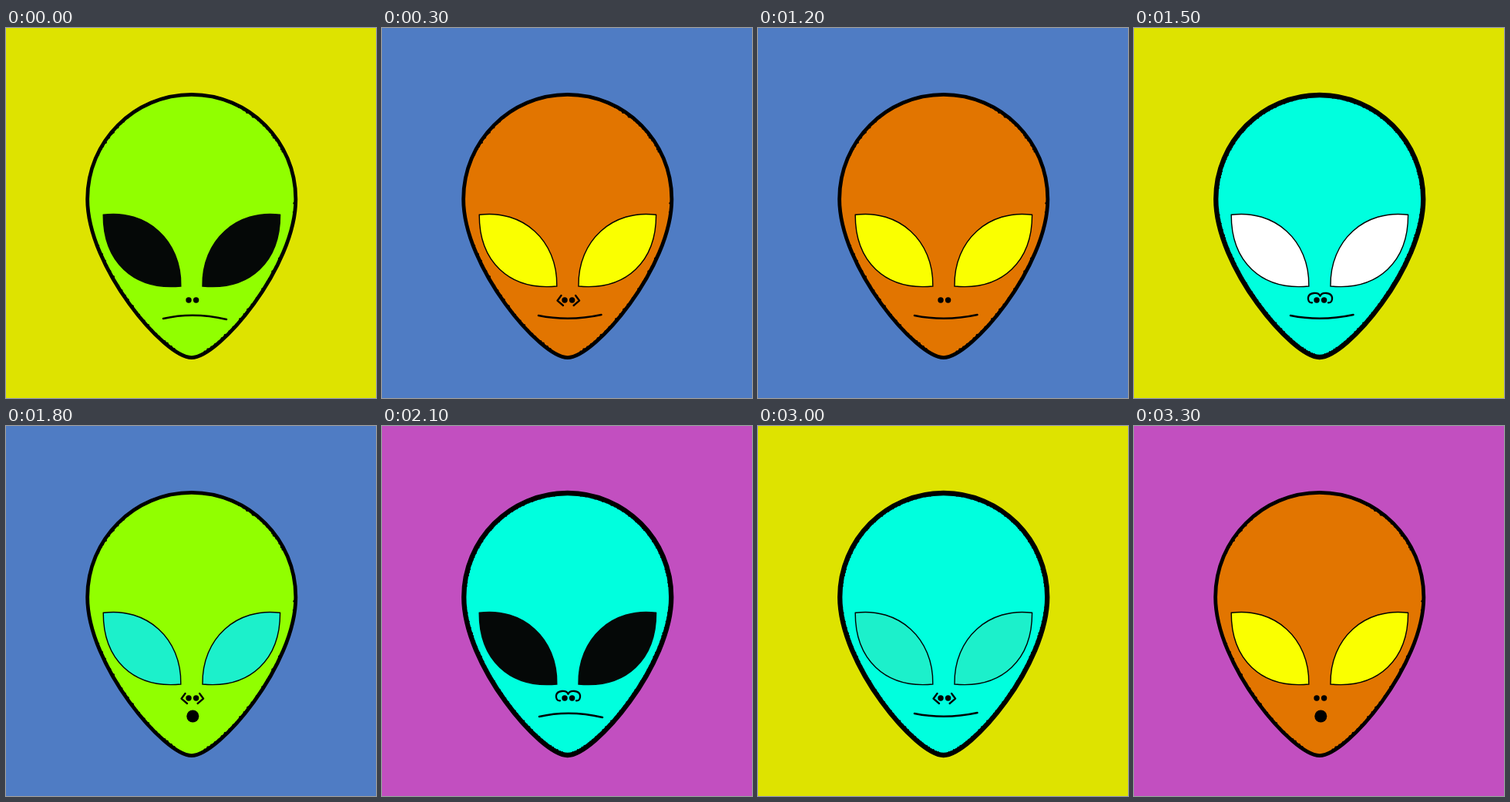
Recreate the animation shown at these times as an HTML page with a canvas. Size 480 by 480 pixels, loop 3.6 s.

```html
<!DOCTYPE html>
<html lang="en">
<head>
<meta charset="utf-8">
<title>Alien faces</title>
<style>
html, body { margin: 0; width: 100%; height: 100%; overflow: hidden; }
canvas { display: block; width: 100vmin; height: 100vmin; }
</style>
</head>
<body>
<canvas id="stage" width="480" height="480"></canvas>
<script>
const ctx = document.getElementById('stage').getContext('2d');
const STEP = 300;
const INK = '#000';

const BACK = { lemon: '#dee300', purple: '#c24fc0', blue: '#4f7cc4' };
const SKIN = { green: '#91ff00', cyan: '#00ffde', orange: '#e27500' };
const EYES = { black: '#050807', white: '#fff', teal: '#1cf0cb', yellow: '#faff00' };

// background, skin, eyes, nose, mouth
const POSES = [
  'lemon green black dots frown',
  'blue orange yellow angles smile',
  'purple green black curls smile',
  'blue orange white angles round',
  'blue orange yellow dots smile',
  'lemon cyan white curls smile',
  'blue green teal angles round',
  'purple cyan black curls frown',
  'blue orange white dots frown',
  'blue green yellow curls round',
  'lemon cyan teal angles smile',
  'purple orange yellow dots round'
].map(line => line.split(' '));

// Right half of the head, measured from its middle
const HEAD = { x: 240.75, y: 256.5 };
const CROWN = [[0, -169.5], [74.3, -169.5], [134.5, -109], [134.5, -34.5]];
const JAW = [[134.5, -34.5], [134.5, 53.5], [35, 170.5], [0, 170.5]];

function seeded(seed) {
  return () => (seed = seed * 16807 % 2147483647) / 2147483647;
}

function bezierAt(curve, t) {
  const u = 1 - t;
  const w = [u * u * u, 3 * u * u * t, 3 * u * t * t, t * t * t];
  return [0, 1].map(k => curve.reduce((sum, p, i) => sum + p[k] * w[i], 0));
}

function headPath(grow) {
  const sx = 1 + grow / 134.5, sy = 1 + grow / 169.5;
  const path = new Path2D();
  path.moveTo(0, CROWN[0][1] * sy);
  const curve = (a, b, c, side) => path.bezierCurveTo(
    a[0] * sx * side, a[1] * sy, b[0] * sx * side, b[1] * sy, c[0] * sx * side, c[1] * sy);
  curve(CROWN[1], CROWN[2], CROWN[3], 1);
  curve(JAW[1], JAW[2], JAW[3], 1);
  curve(JAW[2], JAW[1], JAW[0], -1);
  curve(CROWN[2], CROWN[1], CROWN[0], -1);
  path.closePath();
  return path;
}

function dot(x, y, r) {
  ctx.beginPath();
  ctx.arc(x, y, r, 0, 2 * Math.PI);
  ctx.fill();
}

// Small bumps along the inner edge of the outline
function roughen(curve, side, from, to, count, inset, size, seed) {
  const rand = seeded(seed);
  for (let i = 0; i < count; i++) {
    const t = from + (to - from) * (i + rand() * 0.6) / count;
    const [x, y] = bezierAt(curve, t);
    const [x2, y2] = bezierAt(curve, t + 0.005);
    const len = Math.hypot(x2 - x, y2 - y);
    const nx = -(y2 - y) / len, ny = (x2 - x) / len;
    dot(side * (x + nx * inset), y + ny * inset, size * (0.6 + rand() * 0.7));
  }
}

function drawHead(skin) {
  const thick = skin === 'cyan';
  const path = headPath(thick ? 0 : 0.6);
  ctx.save();
  ctx.translate(HEAD.x, HEAD.y);
  ctx.fillStyle = SKIN[skin];
  ctx.fill(path);
  ctx.strokeStyle = INK;
  ctx.lineWidth = thick ? 6.3 : 4.8;
  ctx.stroke(path);
  ctx.fillStyle = INK;
  if (thick) {
    for (const side of [-1, 1]) {
      roughen(CROWN, side, 0.08, 0.95, 32, 2.8, 0.9, 11);
      roughen(JAW, side, 0.05, 0.95, 40, 2.8, 0.9, 23);
    }
  } else {
    roughen(CROWN, 1, 0.3, 0.72, 16, 1, 1.6, 31);
    roughen(CROWN, -1, 0.42, 0.74, 11, 1, 1.4, 47);
    roughen(JAW, 1, 0.02, 0.08, 2, 1, 1.6, 5);
    roughen(JAW, 1, 0.28, 0.88, 22, 1, 1.5, 59);
    roughen(JAW, -1, 0.22, 0.85, 22, 1, 1.5, 71);
  }
  ctx.restore();
}

function line(d, width) {
  ctx.lineWidth = width;
  ctx.stroke(new Path2D(d));
}

function mirrored(axis, draw) {
  draw();
  ctx.save();
  ctx.translate(2 * axis, 0);
  ctx.scale(-1, 1);
  draw();
  ctx.restore();
}

function drawEyes(eyes) {
  const eye = new Path2D('M126.2 242.3 C182 235 228 275 226.8 335 C164 341 126 302 126.2 242.3Z');
  ctx.fillStyle = EYES[eyes];
  ctx.strokeStyle = eyes === 'black' ? EYES.black : INK;
  ctx.lineWidth = 1.4;
  mirrored(240.9, () => {
    ctx.fill(eye);
    ctx.stroke(eye);
  });
}

function drawNose(nose) {
  dot(237, 353, 3.7);
  dot(246.6, 353, 3.7);
  if (nose === 'curls') {
    mirrored(241.5, () =>
      line('M231 356.3 C227 357 225.5 353 226 349.5 C227 343 239 342 241.5 347.5', 2.3));
  } else if (nose === 'angles') {
    mirrored(241.8, () => line('M232.5 347 L227.5 353.7 L235 360', 2.3));
  }
}

function drawMouth(mouth) {
  if (mouth === 'frown') line('M204 377 Q243 368 286 378', 2.5);
  else if (mouth === 'smile') line('M203 373 Q243 381 284.5 372', 2.5);
  else dot(242.3, 376.5, 8);
}

function draw([back, skin, eyes, nose, mouth]) {
  ctx.fillStyle = BACK[back];
  ctx.fillRect(0, 0, 480, 480);
  drawHead(skin);
  drawEyes(eyes);
  ctx.fillStyle = ctx.strokeStyle = INK;
  ctx.lineCap = ctx.lineJoin = 'round';
  drawNose(nose);
  drawMouth(mouth);
  ctx.lineCap = 'butt';
  ctx.lineJoin = 'miter';
}

const start = performance.now();

function tick() {
  const elapsed = Math.max(0, performance.now() - start);
  draw(POSES[Math.floor(elapsed / STEP) % POSES.length]);
  requestAnimationFrame(tick);
}
tick();
</script>
</body>
</html>
```
